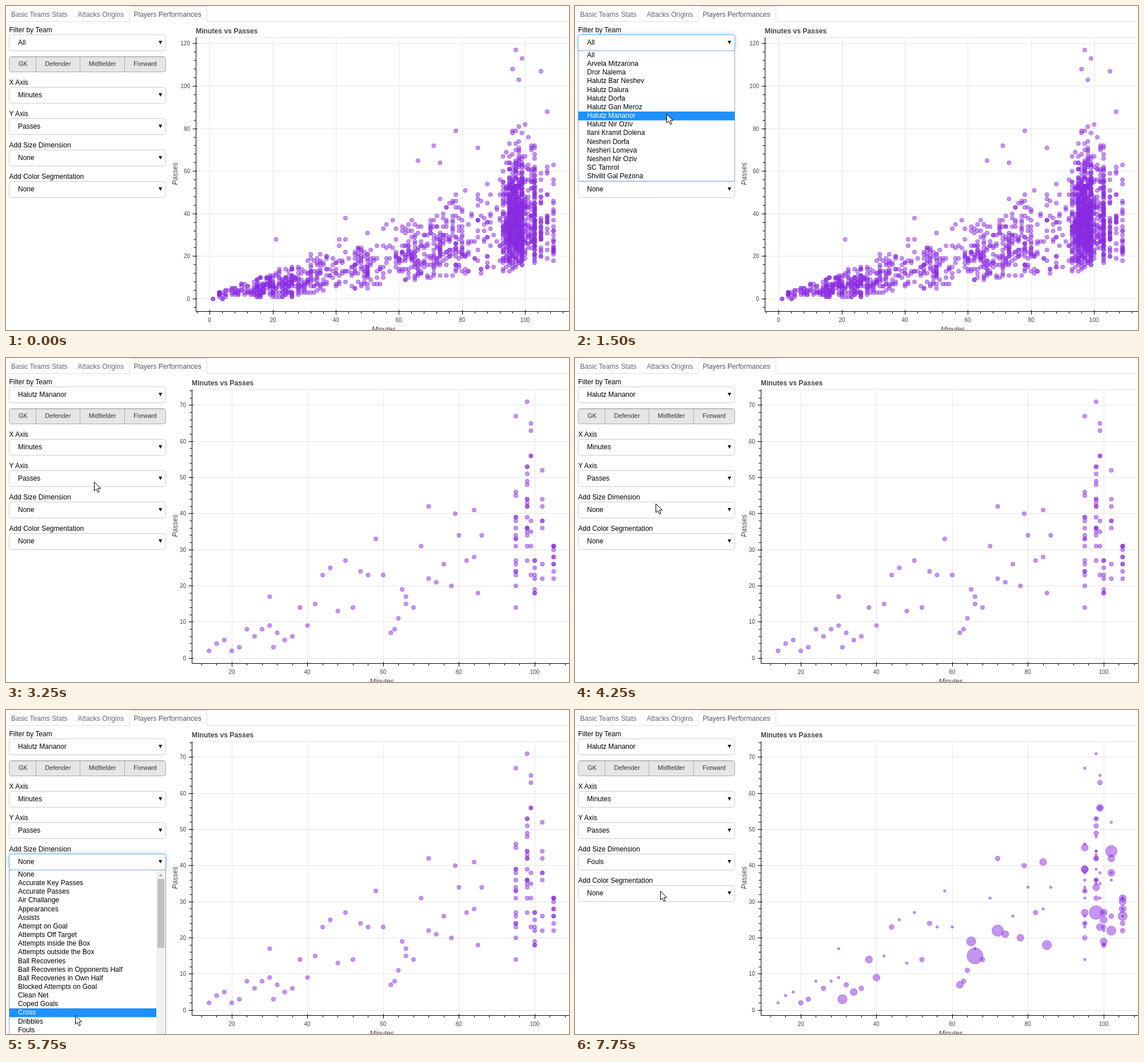
An HTML page for the animation above (8 s loop, 985 by 568 pixels).

```html
<!DOCTYPE html>
<html lang="en">
<head>
<meta charset="utf-8">
<title>Players Performances</title>
<style>
html, body { margin: 0; width: 100%; height: 100%; overflow: hidden; background: #fff; }
svg { display: block; width: 985px; height: 568px; font: 12px "Liberation Sans", Arial, sans-serif; }
.grid { stroke: #e5e5e5; fill: none; }
.axis { stroke: #000; fill: none; }
.dots { fill: #8a2be2; fill-opacity: .5; stroke: #8a2be2; stroke-opacity: .5; }
.tick { font-size: 10px; fill: #444; }
.name { font-style: italic; fill: #444; }
.title { font-size: 12.2px; font-weight: bold; fill: #444; }
.btn { font-size: 11px; fill: #333; }
.box { fill: #fff; stroke: #ccc; }
.focus .box { stroke: #66afe9; filter: drop-shadow(0 0 4px rgba(102, 175, 233, .6)); }
</style>
</head>
<body>
<svg id="stage" viewBox="0 0 985 568"></svg>
<script>
const teams = ["All", "Arvela Mitzarona", "Dror Nalema", "Halutz Bar Neshev", "Halutz Dalura",
  "Halutz Dorfa", "Halutz Gan Meroz", "Halutz Mananor", "Halutz Nir Oziv", "Ilani Kramit Dolena",
  "Nesheri Dorfa", "Nesheri Lomeva", "Nesheri Nir Oziv", "SC Tamrol", "Shvilit Gal Pezona"];
const stats = ["None", "Accurate Key Passes", "Accurate Passes", "Air Challange", "Appearances",
  "Assists", "Attempt on Goal", "Attempts Off Target", "Attempts inside the Box",
  "Attempts outside the Box", "Ball Recoveries", "Ball Recoveries in Opponents Half",
  "Ball Recoveries in Own Half", "Blocked Attempts on Goal", "Clean Net", "Coped Goals",
  "Cross", "Dribbles", "Fouls"];

// Pointer path: time, x, y
const path = [[250, 317, 302], [750, 203, 68], [1000, 197, 61], [1250, 185, 100],
  [1500, 160, 189], [2000, 160, 198], [2750, 160, 198], [4500, 138, 264], [4750, 135, 300],
  [5000, 131, 388], [5250, 127, 485], [6000, 118, 560], [6500, 108, 556], [7750, 149, 317]];

const ROW = 15.15;
const text = (x, y, s, cls = "", more = "") => `<text x="${x}" y="${y}" class="${cls}" ${more}>${s}</text>`;
const rect = (x, y, w, h, more) => `<rect x="${x}" y="${y}" width="${w}" height="${h}" ${more}/>`;
const draw = (d, more) => `<path d="${d}" ${more}/>`;
const group = (id, body) => `<g id="${id}">${body}</g>`;
const px = v => Math.floor(v) + .5;

let seed = 11;
function rand() {
  seed = (seed * 16807) % 2147483647;
  return seed / 2147483647;
}
const between = (a, b) => Math.floor(a + rand() * (b - a));

// Passes grow with minutes; a few full matches run far higher.
function passes(m) {
  const low = Math.max(0, m * .18 - 4), high = 3 + m * .62;
  const tail = m > 92 && m < 104 ? 32 * rand() ** 6 : 0;
  return Math.round(low + (high - low) * ((rand() + rand()) / 2) ** 1.35 + tail);
}

function league() {
  // First minute, end minute, number of players
  const spans = [[3, 14, 55], [14, 21, 95], [21, 36, 170], [36, 46, 50], [46, 52, 65],
    [52, 60, 35], [60, 83, 270], [83, 93, 55], [93, 95, 90], [95, 100, 640], [100, 103, 85],
    [103, 104, 95], [105, 106, 30], [107, 108, 18], [109, 110, 26]];
  const best = [[1, 0], [1, 0], [21, 28], [43, 38], [66, 65], [71, 72], [73, 64], [78, 79],
    [85, 71], [96, 108], [97, 117], [98, 103], [99, 113], [105, 107], [107, 88]];
  const rest = spans.flatMap(([a, b, n]) => Array.from({ length: n }, () => {
    const m = between(a, b);
    return [m, passes(m)];
  }));
  return [...best, ...rest];
}

// Players of one team: minute, passes, fouls
function squad() {
  const key = [[66, 15, 6], [98, 27, 5], [72, 22, 4], [102, 44, 4], [31, 3, 3], [65, 19, 3],
    [85, 18, 3], [105, 26, 3], [102, 22, 3], [98, 71, 0], [95, 67, 0], [99, 65, 0], [99, 63, 1],
    [102, 52, 0], [84, 41, 2], [79, 40, 1], [30, 17, 0], [63, 8, 1]];
  // Minute, number of players, fewest and most passes
  const full = [[95, 17, 14, 54], [98, 17, 31, 55], [99, 6, 23, 57], [100, 8, 18, 28],
    [102, 5, 26, 45], [105, 9, 22, 34]];
  const foulCount = () => Math.floor(3 * rand() ** 1.7);
  const subs = Array.from({ length: 37 }, (_, i) => {
    const m = 14 + Math.round(i * 2);
    return [m, Math.round(passes(m) * .9), foulCount()];
  });
  return [...key, ...subs, ...full.flatMap(([m, n, a, b]) =>
    Array.from({ length: n }, () => [m, between(a, b), foulCount()]))];
}

const viewAll = { left: 332, x0: 356.8, dx: 5.515, y0: 513.5, dy: 3.73, major: 20, minor: 4 };
const viewTeam = { left: 325, x0: 262.5, dx: 6.625, y0: 526, dy: 6.329, major: 10, minor: 2 };

function dots(v, pts, radius = () => 3.6) {
  return `<g class="dots">${pts.map(([m, y, n]) => `<circle cx="${(v.x0 + m * v.dx).toFixed(1)}" cy="${
    (v.y0 - y * v.dy).toFixed(1)}" r="${radius(n)}"/>`).join("")}</g>`;
}

function axes(v) {
  const L = v.left + .5;
  let grid = `M${L} 55.5H985`, lines = `M${L} 55V535.5H985`, labels = "";
  for (let n = -4; n < 124; n += 4) {
    const x = px(v.x0 + n * v.dx);
    if (x < L || x > 985) continue;
    if (n % 20) { lines += `M${x} 535v4`; continue; }
    grid += `M${x} 55V535`;
    lines += `M${x} 533v8`;
    labels += text(x - .5, 553.5, n, "tick", 'text-anchor="middle"');
  }
  for (let n = -v.minor; n < 124; n += v.minor) {
    const y = px(v.y0 - n * v.dy);
    if (y < 55 || y > 535) continue;
    if (n % v.major) { lines += `M${L} ${y}h-4`; continue; }
    grid += `M${L} ${y}H985`;
    lines += `M${L + 2} ${y}h-8`;
    labels += text(v.left - 10, y + 3, n, "tick", 'text-anchor="end"');
  }
  const mid = (v.left + 990) / 2;
  return [draw(grid, 'class="grid"'), draw(lines, 'class="axis"') + labels +
    text(v.left, 48, "Minutes vs Passes", "title") +
    text(mid, 570.5, "Minutes", "name", 'text-anchor="middle"') +
    text(0, 0, "Passes", "name", 'text-anchor="middle" transform="translate(300 294) rotate(-90)"')];
}

function select(id, label, y, value) {
  return group(id, text(5.5, y - 18, label) + rect(5.5, y - 13.5, 274, 28, 'rx="4" class="box"') +
    text(21, y + 4, value, "value") + draw(`M267.2 ${y - 3}h6l-3 6z`));
}

function menu(id, items, top, height, width) {
  return group(id, rect(5.5, top, 274, height, 'fill="#fff" stroke="#7aa9d6"') +
    rect(6, top, width, 15.5, 'class="mark" fill="#1e90ff"') +
    items.map((s, i) => text(21, (top + 11.5 + i * ROW).toFixed(1), s, "item")).join("") +
    (width < 270 ? rect(263, 281, 16, 290, 'fill="#f1f1f1"') + rect(265, 296, 12, 121, 'fill="#c1c1c1"') +
      draw("M267 291.5h7l-3.5-4z", 'fill="#a3a3a3"') : ""));
}

function tabs() {
  return draw("M0 27.5H216.5V4.5Q216.5 .5 220.5 .5H347.5Q351.5 .5 351.5 4.5V27.5H985", 'fill="none" stroke="#ddd"') +
    text(9, 19, "Basic Teams Stats", "", 'fill="#666"') +
    text(125.5, 19, "Attacks Origins", "", 'fill="#666"') +
    text(223.5, 19, "Players Performances", "", 'fill="#555"');
}

function buttons() {
  const names = [["GK", 30], ["Defender", 91], ["Midfielder", 168.5], ["Forward", 243.5]];
  return rect(5.5, 88.5, 274, 27, 'rx="4" fill="#e6e6e6" stroke="#adadad"') +
    draw("M7 89.5H278", 'stroke="#cfcfcf"') + draw("M6.5 90.5H278.5", 'stroke="#dadada"') +
    draw("M52.5 89v26M129.5 89v26M207.5 89v26", 'stroke="#adadad"') +
    names.map(([s, x]) => text(x, 105, s, "btn", 'text-anchor="middle"')).join("");
}

const [gridA, axesA] = axes(viewAll), [gridB, axesB] = axes(viewTeam);
const players = squad();

document.getElementById("stage").innerHTML = tabs() +
  group("plotAll", gridA + dots(viewAll, league()) + axesA) +
  group("plotTeam", gridB + group("even", dots(viewTeam, players)) +
    group("sized", dots(viewTeam, players, n => 2.2 + n * 1.95)) + axesB) +
  buttons() + select("team", "Filter by Team", 64, "All") +
  select("xAxis", "X Axis", 156, "Minutes") + select("yAxis", "Y Axis", 211, "Passes") +
  select("size", "Add Size Dimension", 266, "None") +
  select("color", "Add Color Segmentation", 321, "None") +
  menu("teamMenu", teams, 78.5, 228.5, 273) + menu("sizeMenu", stats, 280.5, 300, 257) +
  group("pointer", draw("M.5 .5V16L4 12.7 6.6 18.5 9.2 17.4 6.7 11.7H11.5Z", 'fill="#fff" stroke="#000"'));

const el = id => document.getElementById(id);
const show = (id, on) => { el(id).style.display = on ? "" : "none"; };

function pointerAt(t) {
  const i = path.findIndex(k => k[0] >= t);
  if (i < 1) return path[0].slice(1);
  const [t0, x0, y0] = path[i - 1], [t1, x1, y1] = path[i], f = (t - t0) / (t1 - t0);
  return [Math.round(x0 + (x1 - x0) * f), Math.round(y0 + (y1 - y0) * f)];
}

function setMenu(id, field, open, top, y) {
  const box = el(id), items = box.querySelectorAll(".item");
  show(id, open);
  el(field).classList.toggle("focus", open);
  const row = Math.max(0, Math.min(items.length - 1, Math.floor((y - top - 3.5) / ROW)));
  box.querySelector(".mark").setAttribute("y", Math.round(top + row * ROW));
  items.forEach((item, i) => item.setAttribute("fill", i === row ? "#fff" : "#000"));
}

let last = -1;
function frame() {
  const t = Math.floor(performance.now() % 8000 / 250) * 250;
  if (t !== last) {
    last = t;
    const [x, y] = pointerAt(t);
    show("pointer", t >= 250);
    el("pointer").setAttribute("transform", `translate(${x} ${y})`);
    show("plotAll", t < 2000);
    show("plotTeam", t >= 2000);
    show("even", t < 6750);
    show("sized", t >= 6750);
    setMenu("teamMenu", "team", t >= 1000 && t < 2000, 78.5, y);
    setMenu("sizeMenu", "size", t >= 4500 && t < 6500, 280.5, y);
    el("team").querySelector(".value").textContent = t < 2000 ? teams[0] : teams[7];
    el("size").querySelector(".value").textContent = t < 6500 ? stats[0] : stats[18];
  }
  requestAnimationFrame(frame);
}
frame();
</script>
</body>
</html>
```
